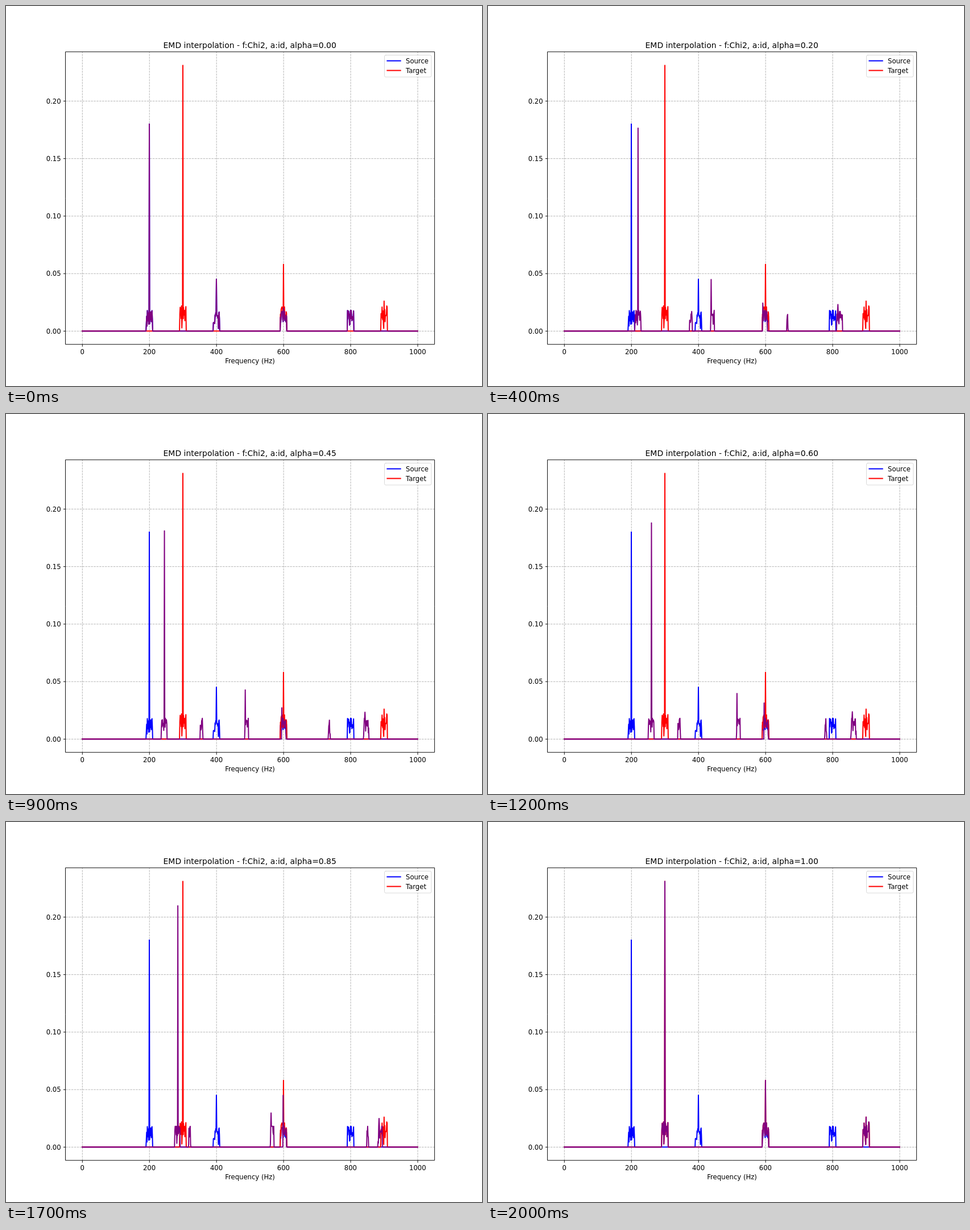
Write an HTML page with a canvas that moves like this. It is 837x669 px and loops after 2100 ms.

```html
<!DOCTYPE html>
<html lang="en">
<head>
<meta charset="utf-8">
<title>EMD interpolation</title>
<style>
  html, body { margin: 0; width: 837px; height: 669px; overflow: hidden; background: #fff; }
  canvas { display: block; }
</style>
</head>
<body>
<canvas id="plot" width="837" height="669"></canvas>
<script>
const ctx = document.getElementById("plot").getContext("2d");
const STEP = 100, STEPS = 21;
const LEFT = 105, RIGHT = 753.6, TOP = 80.7, BOTTOM = 595.7;
const px = hz => 134.1 + hz * 0.5897;
const py = v => 572.2 - v * 2025;
const lerp = (a, b, k) => a + (b - a) * k;

// Repeatable random number from 0 to 1 for each bin.
function random(i) {
  const n = Math.sin(i * 12.9898) * 43758.5453;
  return n - Math.floor(n);
}

// Each peak stands in a 20 Hz wide band of noise.
function spectrum(peaks, noise) {
  const bins = new Array(1001).fill(0);
  for (const [centre, height] of peaks) {
    for (let hz = centre - 9; hz < centre + 10; hz++)
      bins[hz] = noise * random(hz) ** 0.6;
    bins[centre] = height;
  }
  return bins;
}

const first = spectrum([[200, 0.18], [400, 0.045], [600, 0.02], [800, 0.018]], 0.018);
const last = spectrum([[300, 0.231], [600, 0.058], [900, 0.026]], 0.022);

// Bands that travel from one range to another; some carry a spike [Hz, height].
const flows = [
  { from: [190, 210], to: [290, 306], spike: [[200, 0.176], [300, 0.231]] },
  { from: [390, 400], to: [304, 311] },
  { from: [398, 410], to: [589, 601], spike: [[400, 0.045], [592, 0.02]] },
  { from: [590, 605], to: [599, 611], spike: [[590, 0.024], [600, 0.058]] },
  { from: [606, 611], to: [889, 897] },
  { from: [789, 811], to: [897, 912], spike: [[795, 0.023], [901, 0.026]] }
];

function blend(alpha) {
  if (alpha === 0) return first;
  if (alpha === 1) return last;
  const bins = new Array(1001).fill(0);
  for (const { from, to, spike } of flows) {
    const [lo, hi] = from.map((hz, i) => Math.round(lerp(hz, to[i], alpha)));
    for (let hz = lo + 1; hz < hi; hz++) {
      const k = (hz - lo) / (hi - lo);
      const v = lerp(first[Math.round(lerp(...from, k))], last[Math.round(lerp(...to, k))], alpha);
      bins[hz] = Math.max(bins[hz], Math.min(v, 0.018));
    }
    if (spike) {
      const [[a, low], [b, high]] = spike;
      bins[Math.round(lerp(a, b, alpha))] = lerp(low, high, alpha ** 3);
    }
  }
  return bins;
}

function line(points, color, width = 0.93, cap = "butt") {
  ctx.beginPath();
  points.forEach(([x, y]) => ctx.lineTo(x, y));
  ctx.strokeStyle = color;
  ctx.lineWidth = width;
  ctx.lineCap = cap;
  ctx.stroke();
}

const thick = (points, color) => line(points, color, 2, "square");
const curve = (bins, color) => thick(bins.map((v, hz) => [px(hz), py(v)]), color);

function text(str, x, y, align, size = 11.63) {
  ctx.font = size + "px 'DejaVu Sans', sans-serif";
  ctx.textAlign = align;
  ctx.fillStyle = "#000";
  ctx.fillText(str, x, y);
}

// Dashed grid line with a tick at its start.
function gridLine(x0, y0, x1, y1, tickX, tickY) {
  ctx.setLineDash([3.44, 1.49]);
  line([[x0, y0], [x1, y1]], "#b0b0b0");
  ctx.setLineDash([]);
  line([[x0, y0], [x0 + tickX, y0 + tickY]], "#000");
}

function legend() {
  ctx.beginPath();
  ctx.roundRect(665.5, 86.5, 82.4, 38.5, 2.3);
  ctx.fillStyle = "rgba(255,255,255,.8)";
  ctx.fill();
  ctx.strokeStyle = "rgba(204,204,204,.8)";
  ctx.lineWidth = 0.93;
  ctx.stroke();
  [["Source", "#00f"], ["Target", "#f00"]].forEach(([label, color], i) => {
    const y = 96.5 + i * 17;
    thick([[670.4, y], [693.7, y]], color);
    text(label, 703, y + 4.2, "left");
  });
}

function draw(alpha) {
  ctx.fillStyle = "#fff";
  ctx.fillRect(0, 0, 837, 669);
  ctx.lineJoin = "round";
  for (let hz = 0; hz <= 1000; hz += 200) {
    const x = px(hz);
    gridLine(x + 0.2, BOTTOM, x + 0.2, TOP, 0, 4.1);
    text(hz, x, 613, "center");
  }
  for (let i = 0; i <= 4; i++) {
    const v = i * 0.05, y = py(v) + 0.2;
    gridLine(LEFT, y, RIGHT, y, -4.1, 0);
    text(v.toFixed(2), 96.6, y + 4.2, "right");
  }
  curve(first, "#00f");
  curve(last, "#f00");
  curve(blend(alpha), "#800080");
  ctx.strokeStyle = "#000";
  ctx.lineWidth = 0.93;
  ctx.strokeRect(LEFT, TOP, RIGHT - LEFT, BOTTOM - TOP);
  legend();
  text("Frequency (Hz)", 429, 629, "center");
  text(`EMD interpolation - f:Chi2, a:id, alpha=${alpha.toFixed(2)}`, 428.7, 73.8, "center", 13.95);
}

const begin = performance.now();
let shown = -1;
function tick() {
  const step = Math.floor((performance.now() - begin) / STEP) % STEPS;
  if (step !== shown) draw((shown = step) / (STEPS - 1));
  requestAnimationFrame(tick);
}
tick();
</script>
</body>
</html>
```
